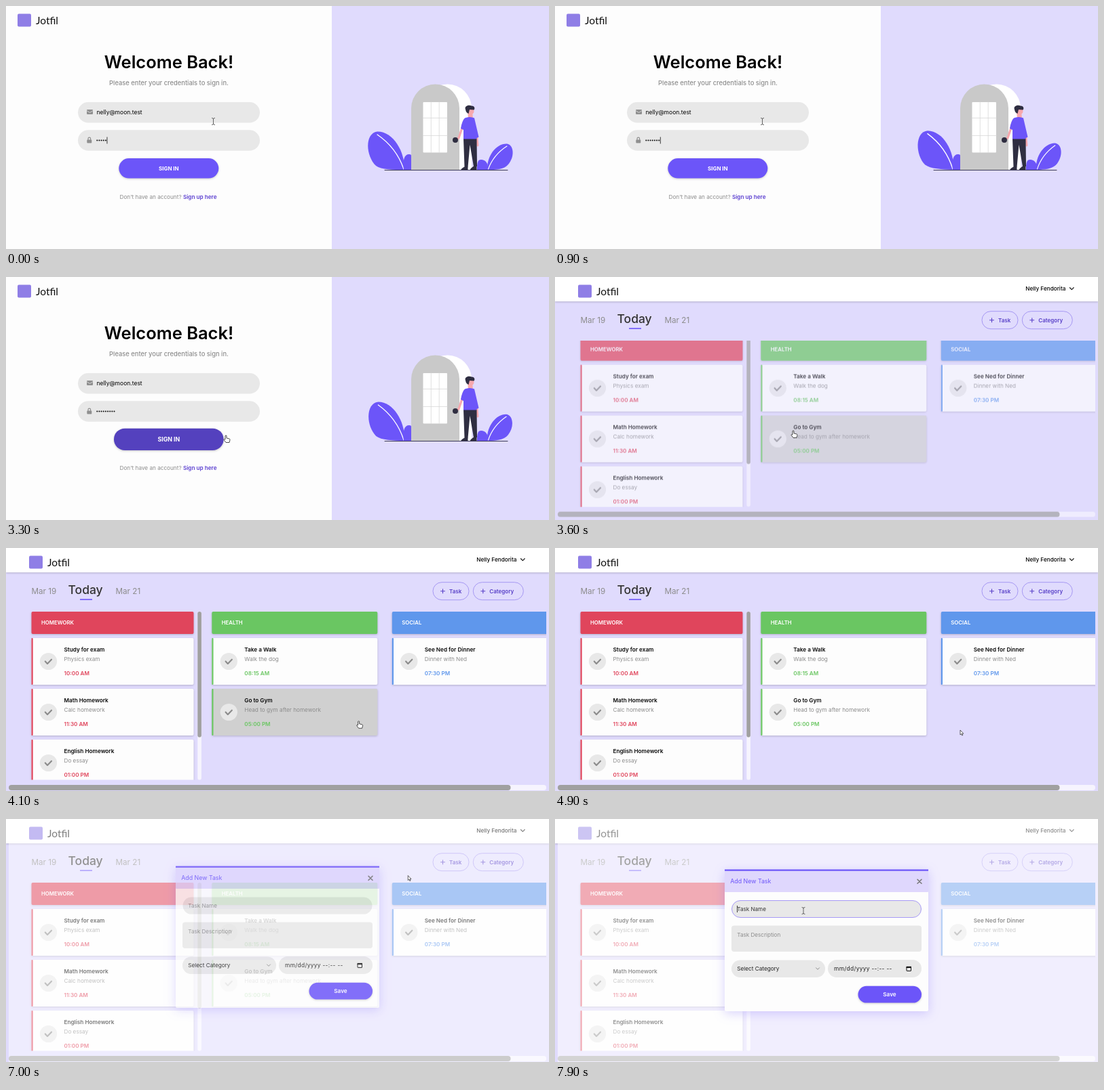
An HTML page for the animation above (8000 ms loop, 800x359 px).

```html
<!DOCTYPE html>
<html lang="en">
<head>
<meta charset="utf-8">
<title>To-do list</title>
<style>
html, body { margin: 0; height: 100%; overflow: hidden; background: #fdfdfd; }
svg { display: block; width: 100vw; height: 100vh; font-family: Inter, Roboto, sans-serif; }
.soft { filter: drop-shadow(0 1px 1.5px #0003); }
.line { fill: none; stroke-linecap: round; stroke-linejoin: round; }
</style>
</head>
<body>
<svg id="stage" viewBox="0 0 800 359"></svg>
<script>
const LOOP = 8000, SWITCH = 3400, OPEN = 6850, FOCUS = 7550;
const PURPLE = '#6c55f9', LILAC = '#e0dbfd', FIELD = '#e8e8e8', GREY = '#8c8c8c', DARK = '#2f2e41', SKIN = '#f7a8ae';

const rect = (x, y, w, h, fill, r = 0, more = '') =>
  `<rect x="${x}" y="${y}" width="${w}" height="${h}" rx="${r}" fill="${fill}" ${more}/>`;
const circle = (x, y, r, fill, more = '') => `<circle cx="${x}" cy="${y}" r="${r}" fill="${fill}" ${more}/>`;
const shape = (d, fill) => `<path d="${d}" fill="${fill}"/>`;
const line = (d, color, w = 1, more = '') =>
  `<path class="line" d="${d}" stroke="${color}" stroke-width="${w}" ${more}/>`;
const text = (x, y, s, size, weight = 400, fill = '#000', more = '') =>
  `<text x="${x}" y="${y}" font-size="${size}" font-weight="${weight}" fill="${fill}" ${more}>${s}</text>`;
const group = (id, body, more = '') => `<g id="${id}" ${more}>${body}</g>`;
const MID = 'text-anchor="middle"';

const logo = x => rect(x, 11.5, 20, 19, '#8f7ee6', 2) +
  text(x + 27, 27.2, 'Jotfil', 15.5, 400, '#111', 'font-family="Lato, sans-serif"');

// Sign-in page
const door = shape('M615 242V151a35.5 35.5 0 0 1 71 0V242Z', '#fff') +
  shape('M597 242V151a35.5 35.5 0 0 1 71 0V242Z', '#c9c9c9') +
  rect(614.5, 142, 35.5, 74.5, '#fff', 1) +
  line('M626.3 142v74.5M638.2 142v74.5M614.5 165.5h35.5M614.5 191.5h35.5', '#d9d9d9', .8);

const man = line('M673 177L667 195L662 198', SKIN, 3.2) +
  line('M693.5 190L695 206', SKIN, 3) +
  circle(662, 198, 4, DARK) +
  shape('M680 156h7l1 10h-7Z', SKIN) +
  circle(684.5, 155.5, 5, SKIN) +
  shape('M677 153C675 148 681 145.500 686 147.500C690 147.500 691.500 151 689.500 153.500L683 153L681.500 159C678.500 158 677.500 156 677 153Z', DARK) +
  shape('M674 195.500h19.500L694 237h-5L683.500 205L680.500 238h-5Z', DARK) +
  shape('M670 242.500q1-3 6-5h4.500v5ZM683.500 242.500q1-3 5-5.500h5v5.500Z', DARK) +
  shape('M676 165.500Q683 162.500 690 165.500L696.500 193.500L693 195.500V196.500H674V183L670 181Q672 169 676 165.500Z', PURPLE);

const plants = group('plantL',
    shape('M587 242C588 215 570 185 547 185.500C528 188 530 222 545 236C553 242 570 242 587 242Z', PURPLE) +
    line('M547 190Q575 209 586 241', '#fff', 1.3)) +
  shape('M586 242C584 227 587 219 594 219Q597 219 597 221V242Z', PURPLE) +
  group('plantR',
    shape('M709 242C708 222 722 203 738 203.500C748 205 750 222 740 234C733 242 722 242 709 242Z', PURPLE) +
    line('M738 207Q718 220 710.500 241', '#fff', 1.1)) +
  shape('M710 242C711 232 706 227 700 227C695 227 694 231 694 242Z', PURPLE);

const login = rect(0, 0, 480, 359, '#fdfdfd') + rect(480, 0, 320, 359, LILAC) + logo(17) +
  text(240, 92.3, 'Welcome Back!', 25.5, 600, '#000', MID) +
  text(240, 117.3, 'Please enter your credentials to sign in.', 9.35, 500, GREY, MID) +
  rect(106, 142, 268, 30.5, FIELD, 15.2) + rect(106, 183.300, 268, 30.5, FIELD, 15.2) +
  rect(119, 153, 9, 7, '#8f8f8f', 1) + line('M119.500 155L123.500 157.500L127.500 155', FIELD, .8) +
  text(133.5, 160, 'nelly@moon.test', 8.5) +
  rect(119.3, 197.5, 7, 5, '#8f8f8f', 1) + line('M121 197.500v-1.500a1.800 1.800 0 0 1 3.600 0v1.500', '#8f8f8f', 1.2) +
  line('', '#111', 2.1, 'id="dots" stroke-dasharray="0 3.15"') +
  rect(0, 193.5, .8, 10, '#111', 0, 'id="caret"') +
  group('signIn', rect(-73.5, -14.7, 147, 29.4, PURPLE, 14.7, 'id="signInBack" class="soft"') +
    text(0, 2.9, 'SIGN IN', 8, 700, '#fff', MID)) +
  text(167.5, 284.5, `Don't have an account? <tspan font-weight="600" fill="#5b3fd0">Sign up here</tspan>`, 8.2, 400, GREY) +
  door + plants + man + line('M558 242.500H739', '#3f3d56');

// Task board
const columns = [
  { x: 37.5, w: 239, name: 'HOMEWORK', color: '#e0455c', cards: [
    ['Study for exam', 'Physics exam', '10:00 AM'],
    ['Math Homework', 'Calc homework', '11:30 AM'],
    ['English Homework', 'Do essay', '01:00 PM']] },
  { x: 303.3, w: 244, name: 'HEALTH', color: '#6ac662', cards: [
    ['Take a Walk', 'Walk the dog', '08:15 AM'],
    ['Go to Gym', 'Head to gym after homework', '05:00 PM', 'gym']] },
  { x: 568.8, w: 244, name: 'SOCIAL', color: '#5f97ec', cards: [
    ['See Ned for Dinner', 'Dinner with Ned', '07:30 PM']] }];

const card = ({ x, w, color }, [title, note, time, id = ''], y) =>
  `<g class="soft">${rect(x, y, w, 69, '#fdfdfd', 2, id && `id="${id}"`)}</g>` +
  rect(x, y, 2.2, 69, color, 1) +
  circle(x + 25, y + 34.5, 12.6, FIELD) +
  line(`M${x + 20.300} ${y + 34.500}l3.200 3.400l6-6.200`, GREY, 2.2) +
  text(x + 48, y + 20, title, 8.2, 600, '#0a0a0a') +
  text(x + 48, y + 34.4, note, 8.2, 400, GREY) +
  text(x + 48, y + 55.1, time, 8.1, 600, color);

const column = c => rect(c.x, 94, c.w, 33, c.color, 2, 'class="soft"') +
  text(c.x + 14.5, 113.3, c.name, 7.8, 600, '#fff') +
  c.cards.map((item, i) => card(c, item, 133 + 75 * i)).join('');

const pill = (id, w, label) => group(id,
  rect(-w / 2, -13, w, 26, 'none', 13, 'stroke="#a698f3"') +
  line(`M${11.5 - w / 2} 0h6m-3-3v6`, '#5840c8', 1.1) +
  text(24 - w / 2, 2.9, label, 8, 600, '#5840c8'));

const board = rect(0, 0, 800, 359, LILAC) +
  rect(0, 0, 800, 36, '#fff', 0, 'class="soft"') + logo(34) +
  text(693.3, 20, 'Nelly Fendorita', 8.2, 500) + line('M758.500 15.800l2.800 2.800l2.800-2.800', '#222', 1.3) +
  text(37.5, 67.8, 'Mar 19', 11.7, 400, GREY) + text(161.5, 67.8, 'Mar 21', 11.7, 400, GREY) +
  text(91.5, 67.8, 'Today', 17.5, 500, '#333') + rect(109, 75.3, 18, 1.6, PURPLE) +
  pill('task', 53, 'Task') + `<g transform="translate(725.3 63.7)">${pill('category', 74, 'Category')}</g>` +
  `<g clip-path="url(#boardClip)">` + group('lists',
    `<g clip-path="url(#listClip)">${columns.map(column).join('')}</g>` +
    rect(282.3, 94, 5.6, 248.5, '#f6f4fe', 2.8) + rect(282.3, 94, 5.6, 185.5, '#a0a0a0', 2.8) +
    rect(4, 350, 792, 8, '#f6f4fe', 4) + rect(4, 350, 739.5, 8, '#a0a0a0', 4)) + '</g>';

// Dialog
const dialog = rect(4, 0, 796, 359, '#fff', 0, 'opacity=".55"') + group('panel',
  rect(250, 75, 300, 209, '#fdfdfd', 2, 'style="filter:drop-shadow(0 3px 8px #6c55f944)"') +
  rect(250, 75, 300, 33, '#dfd7fd', 1) + rect(250, 74.5, 300, 2.2, PURPLE) +
  text(258.3, 95.2, 'Add New Task', 8.8, 400, PURPLE) + line('M534 89.300l6 6m0-6l-6 6', '#777', 1.5) +
  rect(260.5, 120.5, 279, 25, FIELD, 12.5, 'id="nameField"') +
  text(268.3, 136, 'Task Name', 8.1, 400, GREY, 'id="nameHint"') +
  rect(268, 128, .8, 10, '#111', 0, 'id="nameCaret"') +
  rect(260, 157.5, 280, 38.5, FIELD, 4) + text(268.3, 173.5, 'Task Description', 8.1, 400, GREY) +
  rect(260, 208.5, 138, 25.5, FIELD, 12.7) + text(268.3, 224.3, 'Select Category', 8.2, 400, '#222') +
  line('M384.500 219.800l2.500 2.500l2.500-2.500', GREY) +
  rect(402, 208, 138, 26, FIELD, 13) +
  text(411, 224.3, 'mm/dd/yyyy --:-- --', 8.4, 400, '#222', 'letter-spacing=".3"') +
  rect(518, 218.5, 6.5, 6, 'none', .5, 'stroke="#111"') + rect(517.6, 217.8, 7.3, 2.2, '#111') +
  rect(446.5, 246.8, 93.5, 24.7, PURPLE, 12.3, 'class="soft"') +
  text(493, 262, 'Save', 8.2, 600, '#fff', MID));

// Pointers have their hot spot at the origin
const pointers = group('beam', line('M-2-5Q0-5 0-3.500Q0-5 2-5M0-3.500V3.500M-2 5Q0 5 0 3.500Q0 5 2 5', '#555', .9)) +
  group('hand', `<path d="M-1 .5Q0-.5 1 .500V4L5 5Q6 5.300 6 6.500L5 10.500H0L-3 6.500Q-3 5-1 6Z" fill="#fff" stroke="#222" stroke-width=".8" stroke-linejoin="round"/>`) +
  group('arrow', `<path d="M0 0V7L1.600 5.600L2.700 8L3.800 7.500L2.700 5.200H4.800Z" fill="#fff" stroke="#222" stroke-width=".7"/>`);

stage.innerHTML = `<defs>
  <clipPath id="boardClip"><rect y="94" width="800" height="265"/></clipPath>
  <clipPath id="listClip"><rect y="90" width="796" height="252.5"/></clipPath></defs>` +
  group('login', login) + group('board', board) + group('dialog', dialog) + group('pointer', pointers);

const $ = id => document.getElementById(id);
const set = (id, values) => { for (const k in values) $(id).setAttribute(k, values[k]); };
const show = (id, on) => set(id, { visibility: on ? 'inherit' : 'hidden' });
const ramp = (t, from, length) => {
  const p = Math.min(1, Math.max(0, (t - from) / length));
  return p * p * (3 - 2 * p);
};
const easeOut = (t, from, length) => 1 - (1 - Math.min(1, Math.max(0, (t - from) / length))) ** 2;

const route = [[0, 305.5, 170.5], [1500, 305.5, 170.5], [1900, 315.5, 221], [2200, 300, 241], [2900, 300, 241],
  [3300, 324, 234], [3600, 351, 227], [4400, 597, 269], [6000, 597, 269], [6600, 655.5, 69], [OPEN, 655.5, 69],
  [7350, 366, 135.5], [LOOP, 366, 135.5]];

function pointerAt(t) {
  const i = route.findIndex(p => p[0] > t);
  const [a, ax, ay] = route[i - 1], [b, bx, by] = route[i];
  const k = ramp(t, a, b - a);
  return [ax + (bx - ax) * k, ay + (by - ay) * k];
}

function draw(t) {
  const signedIn = t >= SWITCH, open = t >= OPEN;
  show('login', !signedIn);
  show('board', signedIn);
  show('dialog', open);

  const count = 5 + Math.min(4, Math.floor((t + 100) / 400));
  set('dots', { d: `M134.300 198.500h${(count - 1) * 3.15 + .1}` });
  set('caret', { x: 132.8 + 3.15 * count });
  show('caret', !signedIn && t < 2000);
  const hover = ramp(t, 2050, 200);
  set('signIn', { transform: `translate(239.8 239.8) scale(${1 + .1 * hover})` });
  const mix = (a, b) => Math.round(a + (b - a) * hover);
  set('signInBack', { fill: `rgb(${mix(108, 84)},${mix(85, 65)},${mix(249, 190)})` });
  const lean = 1 - Math.cos(2 * Math.PI * (t - 1950) / 2000);
  set('plantL', { transform: `rotate(${lean} 587 242)` });
  set('plantR', { transform: `rotate(${-lean} 709 242)` });

  const [x, y] = pointerAt(t);
  const onGym = signedIn && !open && x < 547 && y > 205;
  const onTask = signedIn && !open && y < 77;
  const onName = open && x > 260 && x < 540 && y > 120;
  const enter = easeOut(t, SWITCH, 460);
  set('lists', { opacity: enter, transform: `translate(0 ${-10.5 * (1 - enter)})` });
  set('gym', { fill: onGym ? '#d0d0d0' : '#fdfdfd' });
  const grow = ramp(t, 6500, 150) - ramp(t, OPEN, 150);
  set('task', { transform: `translate(655.5 63.7) scale(${1 + .07 * grow})` });

  set('dialog', { opacity: easeOut(t, OPEN, 250) });
  set('panel', { transform: `translate(0 ${-20 * (1 - easeOut(t, OPEN, 300))})` });
  const focused = t >= FOCUS;
  set('nameField', { stroke: focused ? '#a79af6' : 'none' });
  set('nameHint', { fill: focused ? '#333' : GREY });
  show('nameCaret', focused);

  const kind = t < 2050 || onName ? 'beam' : !signedIn || onGym || onTask ? 'hand' : 'arrow';
  for (const id of ['beam', 'hand', 'arrow']) show(id, id === kind);
  set('pointer', { transform: `translate(${x} ${y})` });
}

const start = performance.now();
function tick() {
  draw((performance.now() - start) % LOOP);
  requestAnimationFrame(tick);
}
tick();
</script>
</body>
</html>
```
